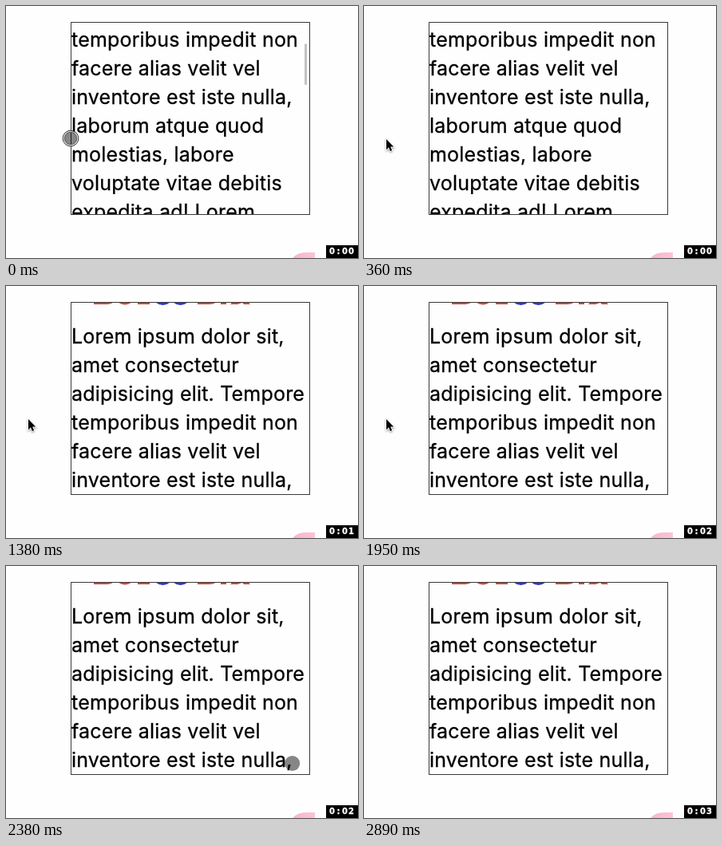
Animation of 441 by 316 pixels, one loop 3.1 s. Source, as an HTML page:

```html
<!DOCTYPE html>
<html lang="la">
<head>
<meta charset="utf-8">
<style>
  html, body { margin: 0; width: 100%; height: 100%; overflow: hidden; background: #fefefe; }
  svg { display: block; }
  #copy text { font: 25px Inter, sans-serif; font-optical-sizing: none; letter-spacing: .2px; stroke: #000; stroke-width: .3; }
  #clock text { font: bold 10px "DejaVu Sans", sans-serif; fill: #fff; stroke: #fff; stroke-width: .3; text-anchor: middle; }
</style>
</head>
<body>
<svg width="441" height="316" viewBox="0 0 441 316">
  <defs>
    <clipPath id="frame"><rect x="82" y="21" width="298" height="240"/></clipPath>
    <linearGradient id="pink"><stop stop-color="#fbb4cd"/><stop offset="1" stop-color="#fcc3d8"/></linearGradient>
  </defs>
  <path d="M359 316Q365 309 376 309H387V316Z" fill="url(#pink)"/>
  <g clip-path="url(#frame)">
    <g id="copy">
      <!-- lower edge of the heading -->
      <g fill="#d8432f">
        <path d="M110 12H135V20Q132 23 124 23H110ZM165 12H180V23H165ZM240 12H264V20Q261 23 254 23H240ZM269 12H276V23H269ZM281 23L286 17H301L306 23H298L296 21L290 23Z"/>
        <ellipse cx="149" cy="15" rx="11" ry="8.5"/>
      </g>
      <g fill="none" stroke="#2c38d6" stroke-width="5">
        <ellipse cx="196.5" cy="12" rx="10" ry="9.5"/>
        <ellipse cx="218.5" cy="12" rx="10" ry="9.5"/>
      </g>
    </g>
  </g>
  <rect x="81.5" y="20.5" width="299" height="241" fill="none" stroke="#3a3a3a"/>
  <rect id="bar" x="374" y="47" width="3" height="52" rx="1.5" fill="#c2c2c2"/>
  <g id="touch">
    <circle r="9.5" fill="#000" fill-opacity=".47"/>
    <g id="ring" fill="none">
      <circle r="9.8" stroke="#222"/>
      <circle r="8.7" stroke="#eee" stroke-width="1.2"/>
      <circle r="7.8" stroke="#444" stroke-width=".7"/>
    </g>
  </g>
  <path id="arrow" transform="translate(28 167) scale(1.05)" d="M0 0V12.5L2.8 9.8L4.7 14.3L6.8 13.4L4.9 9.1H8.8Z"
    stroke="#fff" stroke-width="1.6" paint-order="stroke" style="filter:drop-shadow(0 1px 1px #0006)"/>
  <g id="clock"><rect x="401" y="300" width="40" height="16"/></g>
</svg>
<script>
const $ = id => document.getElementById(id);
const LOOP = 3100, SCROLL = 129;
const lines = ["Lorem ipsum dolor sit,", "amet consectetur", "adipisicing elit. Tempore",
  "temporibus impedit non", "facere alias velit vel", "inventore est iste nulla,",
  "laborum atque quod", "molestias, labore", "voluptate vitae debitis", "expedita ad! Lorem"];

function addText(parent, x, y, string) {
  const node = document.createElementNS("http://www.w3.org/2000/svg", "text");
  node.setAttribute("x", x);
  node.setAttribute("y", y);
  node.textContent = string;
  return parent.appendChild(node);
}

lines.forEach((line, i) => addText($("copy"), 82, 72 + 36 * i, line));
const digits = [..."0:00"].map((char, i) => addText($("clock"), 408.5 + 8 * i, 311, char));

// Touch paths as [time, x, y]
const leave = [[30, 81, 166], [130, 60, 166], [240, 39, 167], [340, 29, 167]];
const cross = [[2130, 28, 167], [2240, 204, 207], [2380, 358, 247], [2510, 395, 324]];

// Smooth curve through the points of a path
function along(path, t) {
  if (t <= path[0][0]) return path[0].slice(1);
  const i = Math.max(1, path.findIndex(p => p[0] >= t));
  const a = path[i - 1], b = path[i], span = b[0] - a[0], k = (t - a[0]) / span;
  const before = path[i - 2] || a, after = path[i + 1] || b;
  return [1, 2].map(c => {
    const m0 = (b[c] - before[c]) / (b[0] - before[0]) * span;
    const m1 = (after[c] - a[c]) / (after[0] - a[0]) * span;
    const d = b[c] - a[c];
    return a[c] + k * (m0 + k * (3 * d - 2 * m0 - m1 + k * (m0 + m1 - 2 * d)));
  });
}

const show = (id, on) => $(id).setAttribute("visibility", on ? "visible" : "hidden");

function draw(now) {
  const t = now % LOOP;
  const leaving = t < 330, crossing = t >= 2150 && t < 2510;
  $("copy").setAttribute("transform", `translate(0 ${t < 1380 ? -SCROLL : 0})`);
  $("bar").setAttribute("opacity", Math.max(0, Math.min(1, (330 - t) / 300)));
  show("touch", leaving || crossing);
  show("ring", t < 30);
  show("arrow", t >= 330 && t < 2150);
  if (leaving || crossing)
    $("touch").setAttribute("transform", `translate(${along(leaving ? leave : cross, t)})`);
  digits[3].textContent = [990, 1950, 2890].filter(s => t >= s).length;
}

const start = performance.now();
function tick() {
  draw(performance.now() - start);
  requestAnimationFrame(tick);
}
tick();
</script>
</body>
</html>
```
